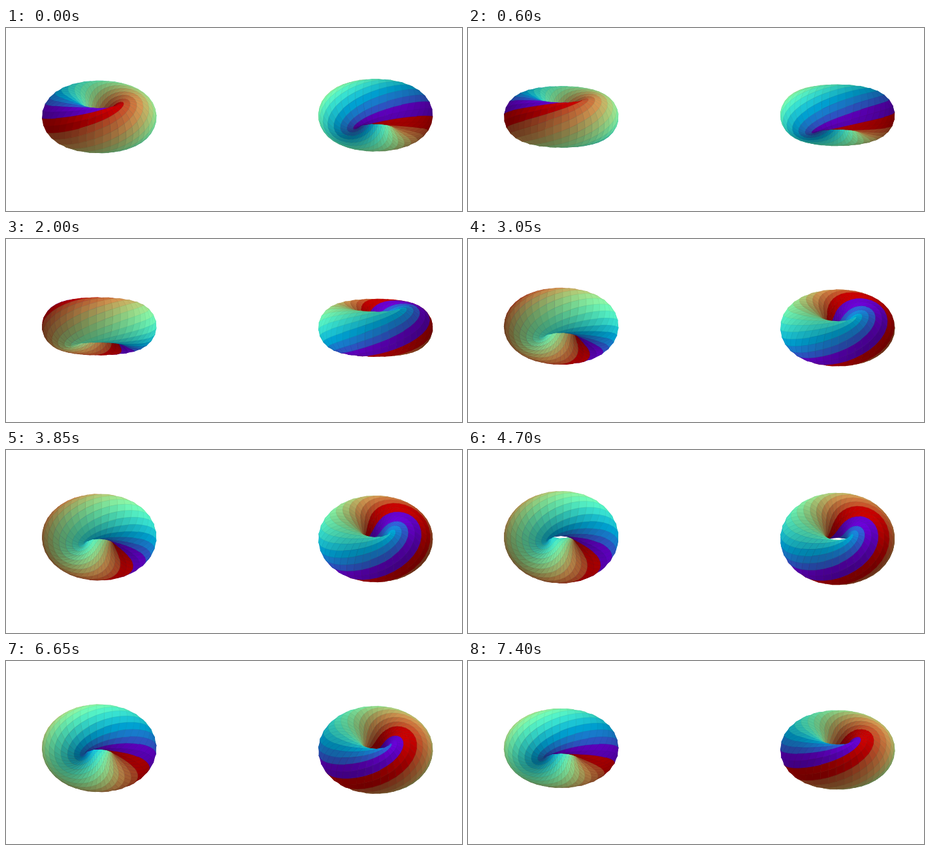
An HTML page with a canvas that plays this animation: 698x281 px, repeating every 7450 ms.

```html
<!DOCTYPE html>
<html lang="en">
<head>
<meta charset="utf-8">
<title>Two turning tori</title>
<style>
  html, body { margin: 0; width: 100%; height: 100%; overflow: hidden; background: #fff; }
  canvas { display: block; width: 698px; height: 281px; }
</style>
</head>
<body>
<canvas id="stage" width="698" height="281"></canvas>
<script>
const ctx = document.getElementById('stage').getContext('2d');
const TAU = Math.PI * 2;
const LOOP = 7450, STEP = 50;
const NOD = 15700, EDGE_ON = 1390;   // nodding period and time of the edge-on view
const MAX_TILT = 0.775;
const TURN = 18500;                  // one full turn about the torus axis
const RING = 53, TUBE = 34.4;
const STRIPS = 18, SEGMENTS = 44;

const clamp = n => Math.max(0, Math.min(1, n));

function rainbow(x) {
  if (x < 0.11) return [0.5, 0, 1];
  if (x > 0.89) return [1, 0, 0];
  return [clamp(Math.abs(2 * x - 0.5)), Math.sin(Math.PI * x), Math.cos(Math.PI * x / 2)];
}

// The light is fixed to the body, so each facet keeps its colour.
function facetColor(strip, u, v) {
  const side = Math.cos(-u - TAU * 0.4) * Math.cos(v);
  const light = 0.71 + 0.27 * side + 0.08 * Math.sin(v);
  const rgb = rainbow((strip + 0.5) / STRIPS);
  const css = k => 'rgb(' + rgb.map(c => Math.round(255 * clamp(c * light * k))) + ')';
  return { fill: css(1), edge: css(0.94) };
}

const facets = [];
for (let k = 0; k < STRIPS; k++) {
  for (let i = 0; i < SEGMENTS; i++) {
    const corner = (di, dk) => {
      const u = TAU * (i + di) / SEGMENTS;
      return [u, u + TAU * (k + dk) / STRIPS];
    };
    const [u, v] = corner(0.5, 0.5);
    facets.push({
      corners: [corner(0, 0), corner(1, 0), corner(1, 1), corner(0, 1)],
      ...facetColor(k, u, v)
    });
  }
}

function drawTorus(cx, cy, tilt, spin) {
  const sinTilt = Math.sin(tilt), cosTilt = Math.cos(tilt);
  const project = ([u, v]) => {
    const rad = RING + TUBE * Math.cos(v);
    const x = rad * Math.sin(u + spin);
    const y = TUBE * Math.sin(v);
    const z = rad * Math.cos(u + spin);
    return [cx + x, cy - y * cosTilt + z * sinTilt, z * cosTilt + y * sinTilt];
  };
  const shapes = facets.map(f => {
    const pts = f.corners.map(project);
    return { f, pts, depth: pts.reduce((sum, p) => sum + p[2], 0) };
  });
  shapes.sort((a, b) => a.depth - b.depth);
  ctx.lineWidth = 0.5;
  for (const { f, pts } of shapes) {
    ctx.beginPath();
    pts.forEach(p => ctx.lineTo(p[0], p[1]));
    ctx.closePath();
    ctx.fillStyle = f.fill;
    ctx.strokeStyle = f.edge;
    ctx.fill();
    ctx.stroke();
  }
}

function draw(t) {
  const tilt = MAX_TILT * Math.sin(TAU * (t - EDGE_ON) / NOD);
  const spin = TAU * (0.26 - t / TURN);
  const shift = 1.3 * Math.tanh((t - 1600) / 300);
  ctx.fillStyle = '#fff';
  ctx.fillRect(0, 0, 698, 281);
  drawTorus(142.7, 135.2 - shift, -tilt, spin + Math.PI);
  drawTorus(565.7, 135.2 + shift, tilt, spin);
}

const start = performance.now();
let shown = -1;
function tick() {
  const t = Math.floor(((performance.now() - start) % LOOP) / STEP) * STEP;
  if (t !== shown) draw(shown = t);
  requestAnimationFrame(tick);
}
tick();
</script>
</body>
</html>
```
